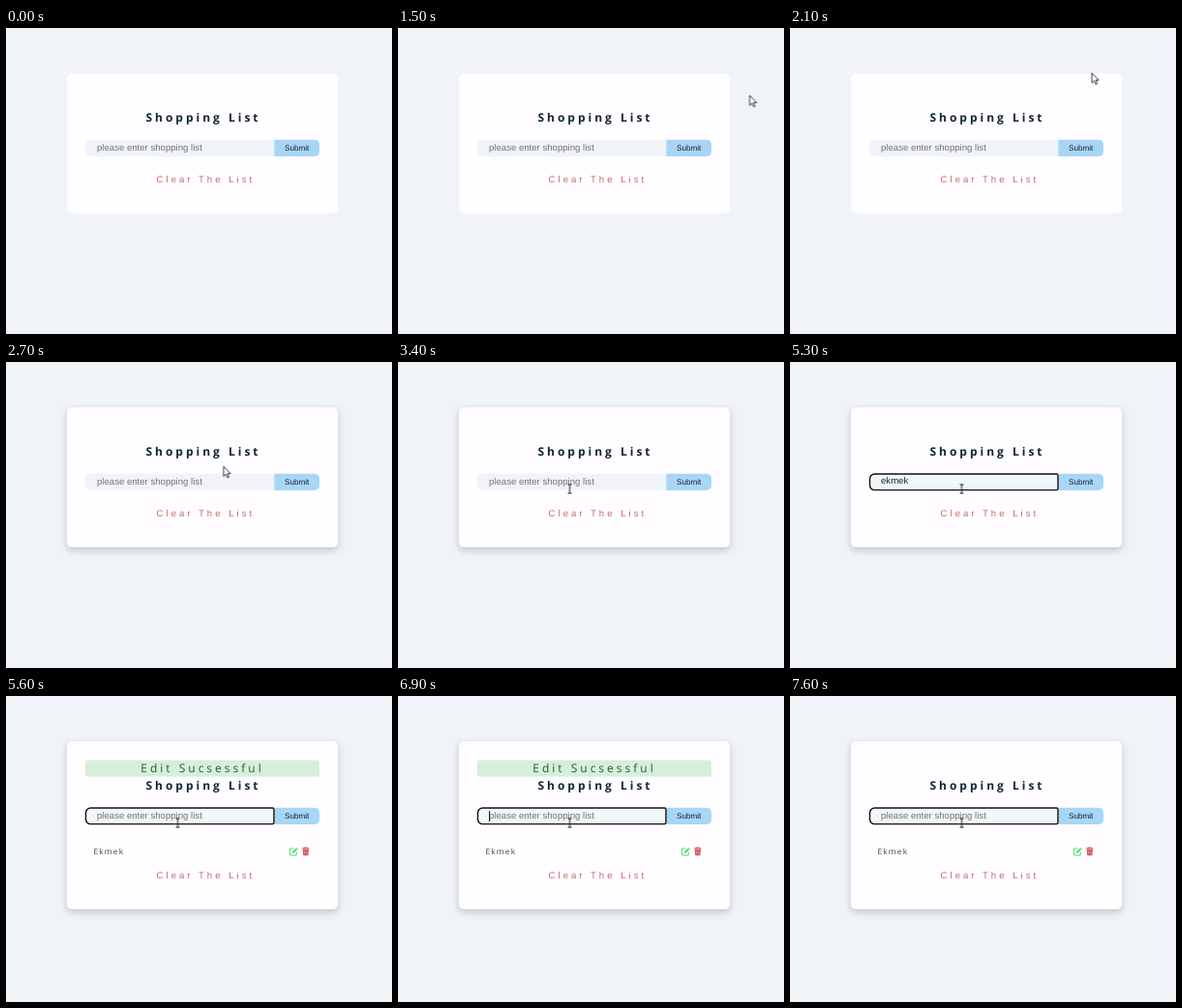
An HTML page for the animation above (8 s loop, 399 px wide and 317 px high).

```html
<!DOCTYPE html>
<html lang="en">
<head>
<meta charset="utf-8">
<title>Shopping List</title>
<style>
  html, body {
    margin: 0;
    width: 100%;
    height: 100%;
    overflow: hidden;
    background: #f0f4f8;
    text-rendering: geometricPrecision;
  }
  svg, .card, .typed { position: absolute; }
  svg { left: 0; top: 0; }

  .card {
    left: 63px;
    top: 47.4px;
    width: 280px;
    height: 144.6px;
    border-radius: 5px;
    background: #fffdff;
    animation: hover 8s linear infinite, grow 8s step-end infinite;
  }

  .typed {
    left: 94px;
    top: 119px;
    width: 0;
    height: 11px;
    overflow: hidden;
    white-space: nowrap;
    color: #20282c;
    border-right: 1px solid transparent;
    animation: type 8s step-end infinite, blink 8s step-end infinite;
  }

  text { white-space: pre; }
  .arial, .typed { font: 9.6px/9px "Liberation Sans", Arial, sans-serif; }
  .open { font: 12px "Open Sans", sans-serif; }
  .wide { letter-spacing: 3px; }
  .title { font-weight: 700; fill: #10262f; }
  .submit { font-size: 8.16px; fill: #14222e; }
  .item { font-size: 8.4px; letter-spacing: 1.2px; fill: #3a444c; }

  .hint, .focus, .alert, .row, .clear, .arrow, .beam {
    animation: 8s step-end infinite;
  }
  .hint { animation-name: hint; }
  .focus { animation-name: focus; }
  .alert { animation-name: alert; }
  .row { animation-name: row; }
  .clear { animation-name: drop; }
  .arrow { animation-name: arrow; }
  .beam { animation-name: beam; }
  .pointer { animation: move 8s linear infinite; }

  @keyframes hover {
    0%, 27.5% { box-shadow: 0 3px 9px rgba(0, 0, 0, 0); }
    31.25%, 100% { box-shadow: 0 3px 9px rgba(0, 0, 0, .2); }
  }
  @keyframes grow {
    0% { height: 144.6px; }
    70%, 100% { height: 173.6px; }
  }
  @keyframes drop {
    0% { transform: none; }
    70%, 100% { transform: translateY(29px); }
  }
  @keyframes type {
    0% { width: 0; }
    53.75% { width: 5.3px; }
    56.25% { width: 10.1px; }
    57.5% { width: 18.1px; }
    58.75% { width: 23.4px; }
    60% { width: 28.3px; }
    70%, 100% { width: 0; }
  }
  @keyframes blink {
    0%, 50%, 66.25%, 80%, 93.75%, 100% { border-color: transparent; }
    43.75%, 53.75%, 73.75%, 86.25% { border-color: #20282c; }
  }
  @keyframes hint {
    0%, 70%, 100% { opacity: 1; }
    53.75% { opacity: 0; }
  }
  @keyframes focus {
    0% { opacity: 0; }
    43.75%, 100% { opacity: 1; }
  }
  @keyframes alert {
    0%, 93.75%, 100% { opacity: 0; }
    70% { opacity: 1; }
  }
  @keyframes row {
    0% { opacity: 0; }
    70%, 100% { opacity: 1; }
  }
  @keyframes arrow {
    0%, 35%, 100% { opacity: 0; }
    18.75% { opacity: 1; }
  }
  @keyframes beam {
    0% { opacity: 0; }
    35%, 100% { opacity: 1; }
  }
  @keyframes move {
    0%, 18.75% { transform: translate(363.6px, 69.8px); }
    26.25% { transform: translate(312px, 46.4px); }
    27.5% { transform: translate(306px, 58px); }
    28.75% { transform: translate(297px, 74px); }
    33.75% { transform: translate(225px, 108px); }
    35% { transform: translate(208px, 116px); }
    40%, 100% { transform: translate(177.5px, 131.5px); }
  }
</style>
</head>
<body>
<div class="card"></div>
<svg width="399" height="317" viewBox="0 0 399 317">
  <g class="alert">
    <rect x="82" y="66.4" width="242" height="17.2" rx="2" fill="#d4f0da"/>
    <text class="open wide" x="203" y="79.2" text-anchor="middle" fill="#36552f">Edit Sucsessful</text>
  </g>
  <text class="open wide title" x="204" y="97" text-anchor="middle">Shopping List</text>

  <path d="M277 115.7H87a5 5 0 0 0-5 5v7.2a5 5 0 0 0 5 5H277Z" fill="#f0f4f8"/>
  <path d="M277.3 115.7H319a5 5 0 0 1 5 5v7.2a5 5 0 0 1-5 5H277.3Z" fill="#a8d6f7"/>
  <path class="focus" d="M275.5 116H87.5a5 5 0 0 0-5 5v6.6a5 5 0 0 0 5 5H275.5a1.5 1.5 0 0 0 1.5-1.5V117.5a1.5 1.5 0 0 0-1.5-1.5Z"
        fill="#f1f6f8" stroke="#101214" stroke-width="1.4"/>
  <text class="arial hint" x="94" y="127.4" fill="#757575">please enter shopping list</text>
  <text class="arial submit" x="288" y="127.4">Submit</text>

  <g class="row">
    <text class="open item" x="90.4" y="164">Ekmek</text>
    <g fill="none" stroke="#55dc72" stroke-width="1.1" stroke-linejoin="round">
      <path d="M297.5 158H294.3a.9.9 0 0 0-.9.9v5.2a.9.9 0 0 0 .9.9h5.2a.9.9 0 0 0 .9-.9V162"/>
      <path d="M296.2 162.6l.3-1.6 3.6-3.6 1.2 1.2-3.6 3.6Z" fill="#55dc72" stroke-width=".6"/>
    </g>
    <g fill="#d0525f">
      <path d="M306.2 157.3h2.1l.5-.7h2l.5.7h2.1v1.1h-7.2Z"/>
      <path d="M306.7 159h6.2l-.4 5.4a.9.9 0 0 1-.9.8h-3.6a.9.9 0 0 1-.9-.8Z"/>
      <path d="M308.4 160v4.2M309.8 160v4.2M311.2 160v4.2" stroke="#f0bcc2" stroke-width=".4"/>
    </g>
  </g>
  <text class="arial wide clear" x="155.6" y="160" fill="#c9686e">Clear The List</text>

  <g class="pointer">
    <path class="arrow" d="M0 0V10.3L2.4 8.1 4 11.8 5.6 11.1 4 7.5H7.2Z" fill="#fff" stroke="#111" stroke-width=".8"/>
    <path class="beam" d="M-2-4.5H2M0-4.5V4.5M-2 4.5H2" fill="none" stroke="#222" stroke-width="1"/>
  </g>
</svg>
<div class="typed">ekmek</div>
</body>
</html>
```
